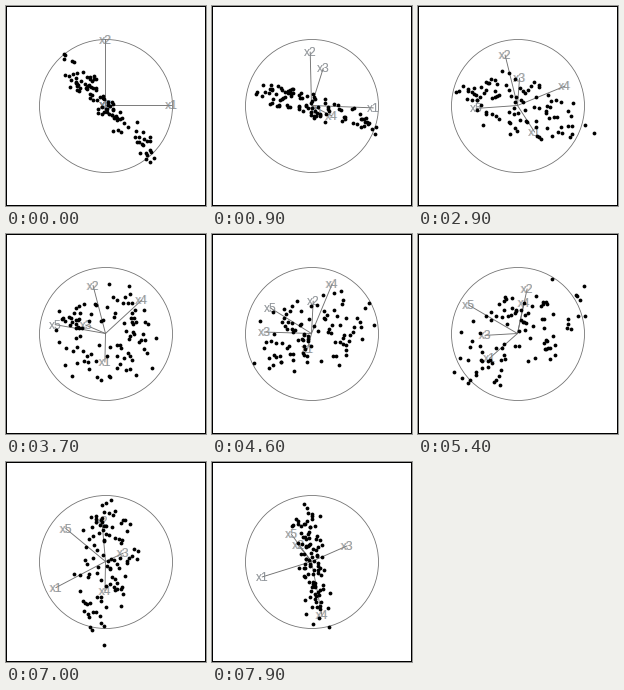
A matplotlib script that plays this animation: 200 px wide and 200 px high, repeating every 8000 ms.

```python
import numpy as np
import matplotlib.pyplot as plt
from matplotlib.animation import FuncAnimation
from matplotlib.patches import Circle

FRAMES, INTERVAL = 80, 100
PX = 0.72  # one pixel in points at 100 dpi
RADIUS = 66
GREY = "#707070"

# Key poses of the tour: frame -> tips of x1..x5 in pixels from the centre.
POSES = {
    0: RADIUS * np.eye(5, 2),
    9: [(62, -2), (-1, 53), (12, 37), (20, -10), (4, -4)],
    21: [(39, -17), (-8, 47), (15, 42), (46, 4), (-22, -8)],
    37: [(-1, -28), (-12, 47), (-20, 8), (37, 33), (-51, 8)],
    46: [(-4, -15), (2, 32), (-47, 1), (21, 49), (-41, 25)],
    61: [(-43, -31), (6, 51), (-3, 2), (-6, 1), (-49, 29)],
    79: [(-50, -16), (-13, 16), (36, 16), (10, -54), (-20, 27)],
}


def orthonormal(m):
    u, _, vt = np.linalg.svd(m, full_matrices=False)
    return u @ vt


times = np.array(list(POSES))
bases = np.array([orthonormal(np.array(p)) for p in POSES.values()])
slopes = np.gradient(bases, times, axis=0)


def basis(t):
    """Smooth Hermite path through the key poses, kept orthonormal."""
    k = min(np.searchsorted(times, t, side="right") - 1, len(times) - 2)
    h = times[k + 1] - times[k]
    s = (t - times[k]) / h
    m = ((1 + 2 * s) * (1 - s) ** 2 * bases[k]
         + s * (1 - s) ** 2 * h * slopes[k]
         + s * s * (3 - 2 * s) * bases[k + 1]
         + s * s * (s - 1) * h * slopes[k + 1])
    return orthonormal(m)


def make_data(n=100):
    """Five correlated variables driven by three factors and some noise."""
    z = np.random.default_rng(7).normal(size=(n, 4))
    z[:, :3] /= np.linalg.norm(z[:, :3], axis=1, keepdims=True) ** 0.6
    q, r = np.linalg.qr(z - z.mean(axis=0))
    a, b, c, e = (q * np.sign(np.diag(r)) * np.sqrt(n)).T
    x1 = 25 * a
    x2 = -x1 + 8 * e
    x4 = 12 * a + 22 * b
    x5 = -3 * a - 7 * b + 21 * c
    x3 = x1 + 0.5 * x5 - 9 * e
    return np.column_stack([x1, x2, x3, x4, x5])


data = make_data()

# The outer half of the frame line falls off the canvas.
fig = plt.figure(figsize=(2, 2), dpi=100, facecolor="white",
                 edgecolor="black", linewidth=2 * PX)
ax = fig.add_axes([0, 0, 1, 1])
ax.set(xlim=(-99.5, 100.5), ylim=(-100.5, 99.5))
ax.axis("off")
ax.add_patch(Circle((0.5, -0.5), RADIUS + 0.5, fill=False, ec=GREY,
                    lw=0.8 * PX))

lines = [ax.plot([], [], color=GREY, lw=0.9 * PX, snap=False, zorder=2)[0]
         for _ in range(5)]
# Warm and cool edges, like subpixel-smoothed type.
FRINGES = {-0.4: "#e09a60", 0.4: "#60a0d8", 0: GREY}
labels = [[ax.text(0, 0, f"x{i + 1}", family="Liberation Sans",
                   size=12 * PX, color=c, alpha=0.45, ha="center",
                   va="center", zorder=3) for c in FRINGES.values()]
          for i in range(5)]
dots, = ax.plot([], [], "o", color="black", ms=3.8 * PX, mew=0, zorder=4)


def draw(i):
    b = basis(i)
    for (x, y), line, copies in zip(b * RADIUS, lines, labels):
        line.set_data([0, x], [0, y])
        for text, dx in zip(copies, FRINGES):
            text.set_position((x + dx, y - 1))
    dots.set_data(*(data @ b).T)
    return [*lines, *sum(labels, []), dots]


anim = FuncAnimation(fig, draw, frames=FRAMES, interval=INTERVAL,
                     repeat=True, repeat_delay=0)
plt.show()
```
